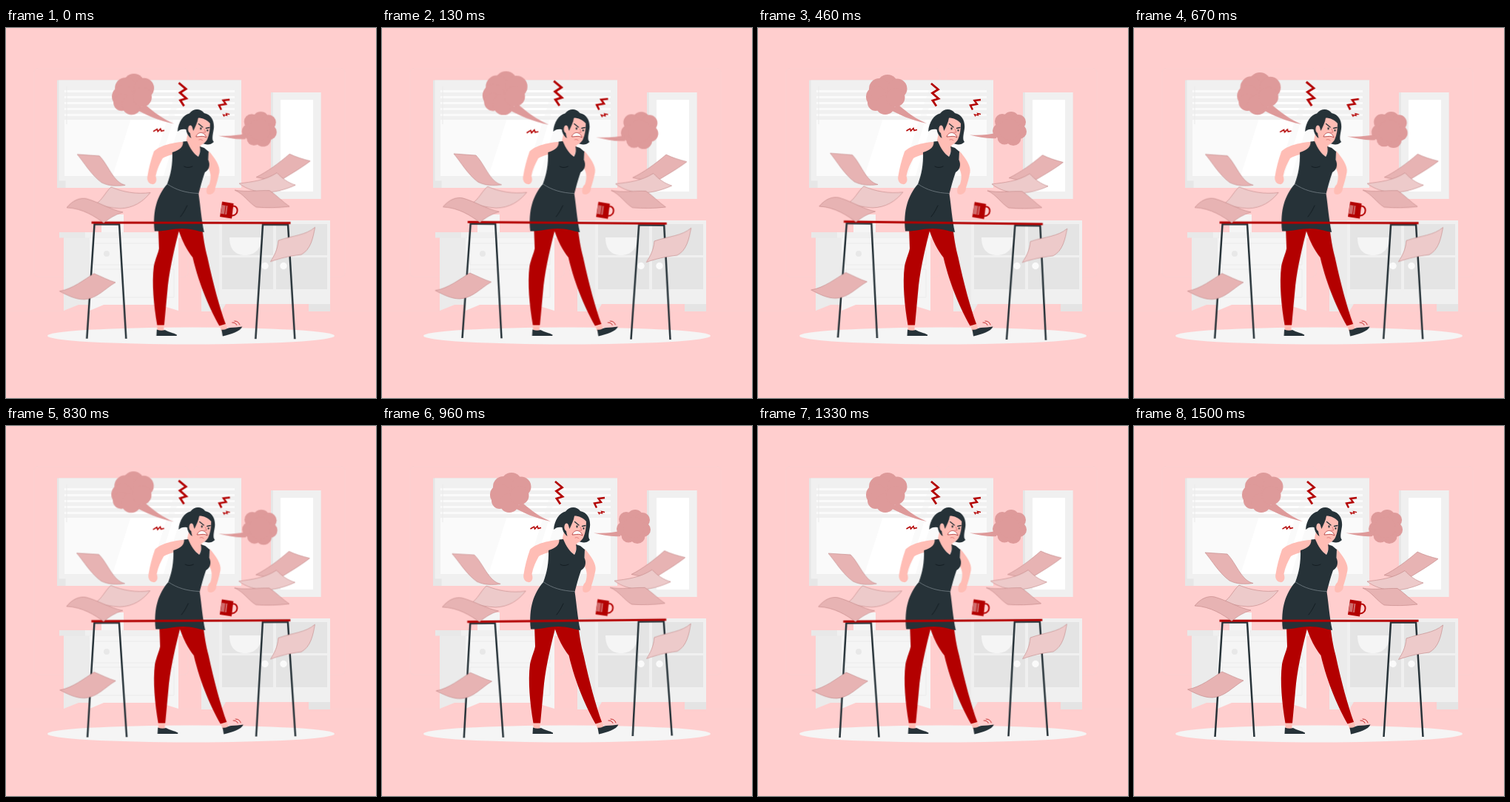
An HTML page for the animation above (1540 ms loop, 500 by 500 pixels).

```html
<!DOCTYPE html>
<html lang="en">
<head>
<meta charset="utf-8">
<title>Angry at work</title>
<style>
  html, body { margin: 0; width: 100%; height: 100%; overflow: hidden; background: #ffcece; }
  svg { display: block; width: 100vw; height: 100vh; }

  .beat, .shake, .wind { animation: 1540ms linear -40ms infinite; }
  .beat { animation-name: beat; transform-origin: 254px 111px; }
  .shake { animation-name: shake; }
  .wind { animation-name: wind; transform-origin: 245px 295px; }

  @keyframes beat {
    0%, 30%, 40%, 60%, 100% { transform: scale(1); }
    10%, 50% { transform: scale(1.1); }
  }
  @keyframes shake {
    0%, 100% { transform: translateX(0); }
    10%, 90% { transform: translateX(-1px); }
    20%, 80% { transform: translateX(2px); }
    30%, 50%, 70% { transform: translateX(-4px); }
    40%, 60% { transform: translateX(4px); }
  }
  @keyframes wind {
    0%, 100% { transform: rotate(0deg); }
    25% { transform: rotate(1deg); }
    75% { transform: rotate(-1deg); }
  }

  .red { fill: #b30000; }
  .ink { fill: #263238; }
  .skin { fill: #ffbdb5; }
  .line { fill: none; stroke-linecap: round; stroke-linejoin: round; }
  .bolt { fill: none; stroke: #b30000; stroke-linejoin: miter; stroke-miterlimit: 8; }
  .smoke { fill: #de9a9a; }
  .paper { fill: #e7b3b3; stroke: #c08484; stroke-width: .6; }
  .pale { fill: #edcaca; }
</style>
</head>
<body>
<svg viewBox="0 0 500 500">
  <defs>
    <clipPath id="pane"><rect x="79" y="79" width="230" height="121"/></clipPath>
    <pattern id="slats" x="0" y="79" width="10" height="8" patternUnits="userSpaceOnUse">
      <rect width="10" height="5" fill="#f0f0f0"/>
    </pattern>
  </defs>

  <!-- wall -->
  <g fill="none" stroke="#fbd0d0">
    <rect x="38" y="55" width="208" height="281" rx="5"/>
    <rect x="254" y="55" width="204" height="281" rx="5"/>
    <path d="M0 382.500H500"/>
  </g>

  <!-- windows -->
  <g>
    <rect x="69" y="70.500" width="249" height="145.500" fill="#e6e6e6"/>
    <rect x="71.500" y="70.500" width="246.500" height="145.500" fill="#f0f0f0"/>
    <rect x="70" y="206.500" width="10.500" height="9.500" fill="#e6e6e6"/>
    <rect x="79" y="79" width="230" height="121" fill="#fafafa"/>
    <path clip-path="url(#pane)" fill="#fff" d="M183 79H232L192 206H142ZM240 79H250L211 206H201Z"/>
    <rect x="77" y="79" width="240" height="45" fill="url(#slats)"/>
    <path d="M82 79V130" stroke="#ebebeb" fill="none"/>
    <rect x="358" y="87" width="67.500" height="144" fill="#e6e6e6"/>
    <rect x="361" y="87" width="64.500" height="144" fill="#f0f0f0"/>
    <rect x="371" y="97" width="44" height="124" fill="#fff"/>
  </g>

  <!-- left cabinet -->
  <g>
    <path fill="#ebebeb" d="M78 283H114V374H98L78 382Z"/>
    <path fill="#f5f5f5" d="M113 283H233V382L207 374H132L113 382Z"/>
    <rect x="72" y="276" width="168" height="7.500" fill="#e8e8e8"/>
    <rect x="107" y="276" width="133" height="7.500" fill="#f0f0f0"/>
    <path fill="none" stroke="#ebebeb" d="M119 291H227V320H119ZM119 326H227V364H119Z"/>
    <circle cx="136" cy="305" r="4" fill="#e8e8e8"/>
    <path fill="#f5f5f5" d="M129 252H159V276H129Z"/>
  </g>

  <!-- right cabinet -->
  <g>
    <path fill="#ebebeb" d="M264 260H438V383H409V373H297L291 383H264Z"/>
    <path fill="#f0f0f0" d="M288 260H438V373H288Z"/>
    <path fill="#e4e4e4" d="M292 265H361V307H292ZM292 310H361V353H292ZM365 265H434V307H365ZM365 310H434V353H365ZM409 373H438V383H409Z"/>
    <path fill="#f5f5f5" d="M302 283H345C345 298 337 307 323 307S302 298 302 283Z"/>
    <circle cx="350" cy="321.500" r="4.700" fill="#fafafa"/>
    <circle cx="375" cy="321.500" r="4.700" fill="#fafafa"/>
  </g>

  <ellipse cx="250" cy="416" rx="194" ry="11.500" fill="#f5f5f5"/>

  <!-- anger clouds and sparks -->
  <g class="beat">
    <g class="smoke">
      <circle cx="175" cy="77" r="14"/>
      <circle cx="164" cy="82" r="14"/>
      <circle cx="188" cy="82" r="13.500"/>
      <circle cx="160" cy="93" r="14"/>
      <circle cx="159" cy="101" r="11"/>
      <circle cx="172" cy="104" r="13"/>
      <circle cx="186" cy="94" r="12.500"/>
      <path d="M178 110C190 117 208 125 228 129C212 122 203 115 190 104Z"/>
      <circle cx="342" cy="124" r="11"/>
      <circle cx="330" cy="126" r="10"/>
      <circle cx="327" cy="139" r="10"/>
      <circle cx="352" cy="127" r="10"/>
      <circle cx="353" cy="140" r="10"/>
      <circle cx="345" cy="148.500" r="10.500"/>
      <circle cx="333" cy="148" r="9.500"/>
      <circle cx="340" cy="137" r="14"/>
      <path d="M286 144.500C300 145.500 312 144 322 142V149C310 150 298 147 286 144.500Z"/>
    </g>
    <g class="bolt">
      <path stroke-width="2.800" d="M234 75 243.500 83 235.500 88 244 95.500 236 98 241 105.500"/>
      <path stroke-width="2.400" d="M301 97 292.500 98 296 103 287 104.500 290 110.500"/>
      <path stroke-width="1.300" d="M301 116.500 296.500 115.500 297.500 118 292.500 117 294 119.500"/>
      <path stroke-width="1.500" d="M200.500 139 205.500 136 206.500 139 210 135.500 211 138.500 215 137.500"/>
    </g>
  </g>

  <!-- woman -->
  <g class="shake">
    <path class="skin" d="M274 166C283 176 290 187 288.500 195C287 203 285 210 283 216C283 223 277 227 272 224C270 219 272 214 275 211C278 202 277 195 273 188Z"/>
    <path class="skin" d="M204.500 399H213.500V410H204.500ZM288 399 296.500 397 299.500 407 291.500 410Z"/>
    <path class="ink" d="M204 407.500C208 409 212 409 215 408C220 411 227 412 231 414.500V416H203.500ZM291.500 407.500C296 409 299 405 303 405C309 405 314 404 319.500 403.500C317 410 304 414 293 416.500Z"/>
    <path class="red" d="M232 268H265C267 284 269 297 272.500 310C280 345 289 378 297 400L288.500 402.500C277 382 262 350 252.500 310C246 302 237 287 232 268Z"/>
    <path class="red" d="M206 270H235C229 293 222 322 219 348L214 401.500H204.500C200 375 197 345 200 322C202 312 206 304 207 298Z"/>
    <path class="skin" d="M246 142 243 156 247 164 260 174 264 162 262 150Z"/>
    <path class="skin" d="M243 153.500C228 154 207 159 200 167C196 178 193 190 191.500 200C190 207 194 212 200 211C204 209 204 204 202.500 200C204 191 208 183 212 176C219 172 230 169 240 168Z"/>
    <path class="ink" d="M239.500 153.500 245 153C249 163 254 170 260 174C263 169 263 164 262 160L268 162 274 167 273.500 178C277 186 274 192 269 195C265 206 263 215 260.500 224C263 240 264 258 268 276C258 274 250 271 238 271C226 271 213 275 201 274.500C198 246 205 226 218 211C223 198 225.500 184 225 168C231 166 240 163 239.500 153.500Z"/>
    <g class="line" stroke="#758087" stroke-width=".8">
      <path d="M218.500 211C230 219 244 223 260 223.500"/>
      <path stroke="#10191e" d="M245 240C242 246 240 250 236 255M241 187C244 189 248 189 252 187"/>
    </g>

    <path class="ink" d="M232 140C233 127 240 117 248 115.500C254 108 263 108.500 268 115C278 117 282 126 281 136C279.500 145 278 151 281 154C276 159 270 158 264 155L249 148C246 145 244 141 243.500 137C239 136 235 137 232 140Z"/>
    <path class="skin" d="M260 121.500C266 121.500 272 124 276 129C276 137 275 144 272 151C268 157 263 160 257 158C253 155 250 150 249 142C245 140 246 132 249 131.500C252 131 252 135 253.500 139C256 133 259 128 260 121.500Z"/>
    <path d="M257 147C259 140 268 139 271 148C266 145 262 147 257 147Z" fill="#fff" stroke="#b34040" stroke-width=".9"/>
    <g class="line" stroke="#263238" stroke-width="1.300">
      <path d="M260.500 129.500 266 134M275 134.500 270.500 135.500"/>
      <path stroke-width="2" d="M263.500 135.200V136.400M272.500 138V138.800"/>
      <path stroke="#d96f6f" stroke-width=".8" d="M268 136.500 270 141H267M261 151C263 150 265 151 266 152"/>
    </g>
    <path class="line" stroke="#b30000" stroke-width=".8" d="M306 398C309 398 311 399 312 401.500M309 396C313 396 315 398 316 401"/>
  </g>

  <!-- table, mug and flying papers -->
  <g class="wind">
    <path fill="none" stroke="#263238" stroke-width="2.500" d="M109.500 420 119.500 265.500H153L162.500 420M337.500 420 347 265.500H381L390.500 420"/>
    <rect class="red" x="115.500" y="261.700" width="269" height="3"/>
    <path class="red" d="M292 234.500 307.500 237 305 257.500 289 255Z"/>
    <path fill="#cf6b6b" d="M291.500 239 299.500 240.200 298 252 290 250.800Z"/>
    <path stroke="#b30000" stroke-width="1" d="M297 240 295.500 251.500"/>
    <path class="line" stroke="#b30000" stroke-width="2" d="M306.500 240.500C315 240 314.500 253 305.500 253.500"/>

    <path class="paper" d="M96 171 126 173C138 185 145 209 161 212.500C150 214 139 214 129 209C115 199 104 180 96 171Z"/>
    <path class="paper pale" d="M142 215C158 222 177 225 195 222.500C185 235 172 243.500 154 244C143 243.500 132 241 121 238C130 233 134 222 142 215Z"/>
    <path class="paper" d="M82 243C90 233 100 229 109 231C124 235 142 246 158 249C148 252 140 257 132 263.500C120 255 104 244 82 243Z"/>
    <path class="paper" d="M72.500 356C90 353 106 340 119 332C129 336 138 341 148 344C134 352 123 366 106 367C94 367 84 362 72.500 356Z"/>
    <path class="paper" d="M383 170C368 183 353 194 338 201.500C348 204 358 204 368 207.500C381 199 396 191 411 179.500C401 177 391 174 383 170Z"/>
    <path class="paper pale" d="M366 195.500C350 206 331 208 315 210C325 218 338 221 348 222C364 222 378 218 391 212C381 209 373 203 366 195.500Z"/>
    <path class="paper" d="M309 219C325 222 340 219 356 219.500C366 226 374 235 383 241C367 243 352 243 338 242C328 236 321 224 309 219Z"/>
    <path class="paper pale" d="M417.500 269C405 280 388 280 368 287C367 300 362 308 357.500 315.500C370 311 383 308 399 306C412 299 415 283 417.500 269Z"/>
  </g>
</svg>
</body>
</html>
```
